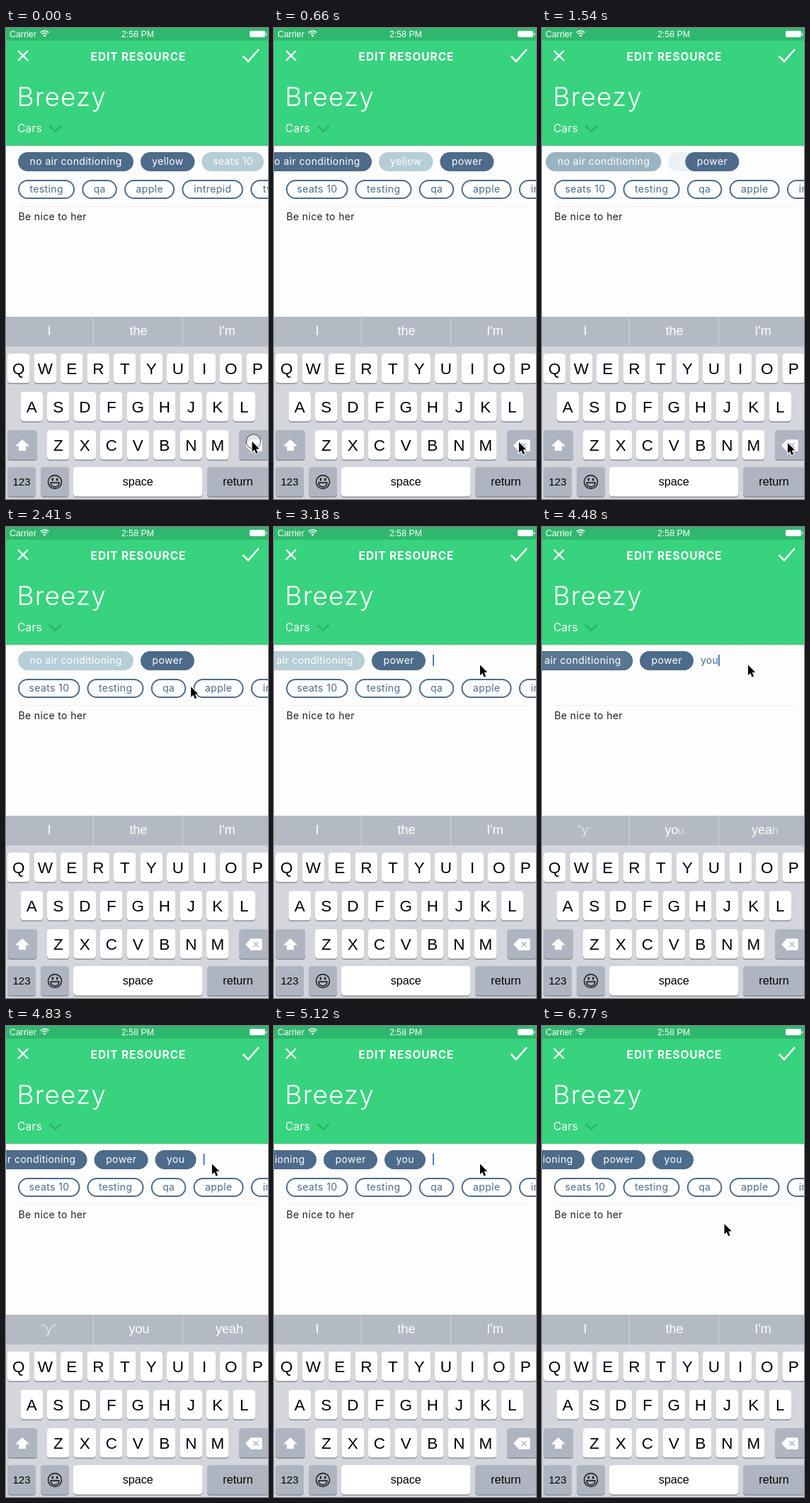
An HTML page with a canvas for the animation above (6830 ms loop, 370 px wide and 664 px high).

```html
<!DOCTYPE html>
<html lang="en">
<head>
<meta charset="utf-8">
<title>Edit resource</title>
<style>
  html, body { margin: 0; width: 100%; height: 100%; overflow: hidden; background: #fdfdfd; }
  canvas { display: block; }
</style>
</head>
<body>
<canvas id="stage" width="370" height="664"></canvas>
<script>
const ctx = document.getElementById('stage').getContext('2d');
const LOOP = 6830;
const SANS = 'Inter, sans-serif';
const SYSTEM = '"Liberation Sans", Arial, sans-serif';
const DARK = [77, 107, 138], LIGHT = [182, 206, 214];
const BLUE = `rgb(${DARK})`;
const KEY_GRAY = '#aeb5c0';
const CHIP_WIDTH = {
  'no air conditioning': 163, yellow: 76.5, 'seats 10': 87.5, power: 76, you: 58,
  testing: 80, qa: 49.5, apple: 71, intrepid: 86.5, tv: 48
};
const COMMIT = 4720;

// Timing helpers
const ramp = (t, from, to) => Math.min(1, Math.max(0, (t - from) / (to - from)));
const ease = (t, from, to) => {
  const p = ramp(t, from, to);
  return p * p * (3 - 2 * p);
};
const within = (t, from, to) => t >= from && t < to;
const mix = (a, b, p) => `rgb(${a.map((v, i) => Math.round(v + (b[i] - v) * p))})`;

// Drawing helpers
function text(str, x, y, size, color, { font = SANS, weight = 400, align = 'left', spacing = 0 } = {}) {
  ctx.font = `${weight} ${size}px ${font}`;
  ctx.letterSpacing = spacing + 'px';
  ctx.textAlign = 'left';
  ctx.fillStyle = color;
  const width = ctx.measureText(str).width;
  ctx.fillText(str, align === 'center' ? x - (width - spacing) / 2 : x, y);
  return width;
}

function box(x, y, w, h, r, color) {
  ctx.beginPath();
  ctx.roundRect(x, y, w, h, r);
  ctx.fillStyle = color;
  ctx.fill();
}

function line(points, color, width, close) {
  ctx.beginPath();
  points.forEach(([x, y]) => ctx.lineTo(x, y));
  if (close) ctx.closePath();
  ctx.strokeStyle = color;
  ctx.lineWidth = width;
  ctx.stroke();
}

function shape(points, color) {
  ctx.beginPath();
  points.forEach(([x, y]) => ctx.lineTo(x, y));
  ctx.closePath();
  ctx.fillStyle = color;
  ctx.fill();
}

function arc(x, y, r, from, to, color, width) {
  ctx.beginPath();
  ctx.arc(x, y, r, from, to);
  ctx.strokeStyle = color;
  ctx.lineWidth = width;
  ctx.stroke();
}

function faded(alpha, draw) {
  if (alpha <= 0) return;
  ctx.save();
  ctx.globalAlpha = alpha;
  draw();
  ctx.restore();
}

function chip(label, x, y, { light = 0, outline = false, alpha = 1 } = {}) {
  const w = CHIP_WIDTH[label];
  faded(alpha, () => {
    if (outline) {
      box(x + 1, y + 1, w - 2, 25, 12.5, '#fff');
      ctx.strokeStyle = BLUE;
      ctx.lineWidth = 2;
      ctx.stroke();
    } else {
      box(x, y, w, 27, 13.5, mix(DARK, LIGHT, light));
    }
    text(label, x + w / 2, y + 17.5, 14, outline ? BLUE : '#fff', { align: 'center', spacing: 0.4 });
  });
}

function drawHeader() {
  box(0, 0, 370, 166, 0, '#37d37e');
  box(0, 0, 370, 18, 0, '#2fb86d');
  const shadow = ctx.createLinearGradient(0, 165, 0, 168);
  shadow.addColorStop(0, 'rgba(120,150,135,.4)');
  shadow.addColorStop(1, 'rgba(120,150,135,0)');
  box(0, 165, 370, 3, 0, shadow);

  text('Carrier', 5, 13, 12.4, '#fff', { font: SYSTEM });
  text('2:58 PM', 186, 13, 12.4, '#fff', { font: SYSTEM, align: 'center' });
  for (const r of [8, 5]) arc(54.5, 12, r, -Math.PI * 0.76, -Math.PI * 0.24, '#fff', 1.7);
  shape([[52.5, 10.5], [54.5, 9.3], [56.5, 10.5], [54.5, 13]], '#fff');
  box(344, 4, 22, 9, 2, '#fff');
  box(367, 7, 1.5, 3.5, 0.7, '#fff');

  line([[17, 32], [31, 46]], '#fff', 2.4);
  line([[31, 32], [17, 46]], '#fff', 2.4);
  line([[334.5, 39.5], [342, 47], [357, 30]], '#fff', 2.6);
  line([[61.5, 138], [69.5, 145.5], [77.5, 138]], '#2bb66a', 3);
  text('EDIT RESOURCE', 186.5, 46, 15.5, '#fff', { weight: 700, align: 'center', spacing: 0.9 });
  text('Breezy', 15.5, 110, 37, '#fff', { weight: 300, spacing: 1.1 });
  text('Cars', 16, 147, 15.5, '#fff', { spacing: 0.2 });
}

function caretAlpha(t) {
  if (t < 2800) return 0;
  if (t < 4190) return 1 - ramp(t, 3670, 3830);
  if (t < 5600) return 1;
  if (t < 6000) return 1 - ramp(t, 5550, 5760);
  return ramp(t, 6000, 6180) - ramp(t, 6550, 6770);
}

function drawTags(t) {
  const dropSeats = ease(t, 330, 650);
  const dropYellow = ease(t, 1345, 1645);
  const focus = ease(t, 2790, 3170);
  const commit = ease(t, COMMIT, 5110);
  const scroll = 42 * dropSeats * (1 - dropYellow) + 52 * focus + 68 * commit;
  const top = 175;

  const selected = dropYellow * (1 - ramp(t, 4190, 4520));
  chip('no air conditioning', 17 - scroll, top, { light: selected });
  if (within(t, 4190, 4520)) {
    ctx.strokeStyle = BLUE;
    ctx.lineWidth = 1.5;
    ctx.beginPath();
    ctx.roundRect(17.75 - scroll, top + 0.75, 161.5, 25.5, 12.75);
    ctx.stroke();
  }
  chip('yellow', 190 - scroll, top, { light: dropSeats, alpha: 1 - dropYellow });
  chip('seats 10', 276.5 - scroll, top, { light: 1, alpha: 1 - dropSeats });
  chip('power', 374 - 97.5 * dropSeats - 86.5 * dropYellow - scroll, top);

  let caretX = 276 - scroll;
  if (t >= COMMIT) {
    chip('you', 276 - scroll, top);
    caretX = 344 - scroll;
  } else if (t >= 4190) {
    const typed = 'you'.slice(0, t < 4310 ? 1 : t < 4430 ? 2 : 3);
    caretX += text(typed, caretX, 192.5, 14, BLUE, { spacing: 0.2 });
  }
  faded(caretAlpha(t), () => box(caretX, 180, 2, 16, 0, '#3f7fc9'));

  if (!within(t, 4190, COMMIT)) {
    let x = 17 + 97.5 * dropSeats;
    for (const label of ['testing', 'qa', 'apple', 'intrepid', 'tv']) {
      chip(label, x, 214, { outline: true });
      x += CHIP_WIDTH[label] + 10.3;
    }
    chip('seats 10', 17, 214, { outline: true, alpha: dropSeats });
  }
  box(18, 251, 342, 1, 0, '#eeeff0');
  text('Be nice to her', 17.5, 270.5, 14, '#222', { spacing: 0.35 });
}

function drawPredictions(t) {
  box(0, 407, 370, 42, 0, '#b3bac4');
  box(123, 407, 1, 42, 0, '#d2d6dc');
  box(249, 407, 1, 42, 0, '#d2d6dc');
  const typing = ramp(t, 4190, 4370) - ramp(t, 4860, 5110);
  const grow = ramp(t, 4250, 4640);
  const centers = [61, 187, 312];
  faded(1 - typing, () => ['I', 'the', "I'm"].forEach((word, i) =>
    text(word, centers[i], 433, 18, '#fff', { font: SYSTEM, align: 'center' })));
  [['“y', '”', 50], ['yo', 'u', 173.5], ['yea', 'h', 296]].forEach(([head, tail, x], i) => {
    const strength = typing * (i ? 1 : 0.6);
    faded(strength, () => { x += text(head, x, 433, 18, '#fff', { font: SYSTEM }); });
    faded(strength * grow, () => text(tail, x, 433, 12 + 6 * grow, '#fff', { font: SYSTEM }));
  });
}

function key(x, y, w, label = '', color = '#fff', size = 22.5) {
  box(x, y + 1, w, 42, 4.5, '#898c92');
  box(x, y, w, 41.5, 4.5, color);
  text(label, x + w / 2, y + (size > 20 ? 29 : 26), size, '#000', { font: SYSTEM, align: 'center' });
}

function drawKeyboard(t) {
  box(0, 449, 370, 215, 0, '#d3d6dc');
  [['QWERTYUIOP', 2], ['ASDFGHJKL', 20.5], ['ZXCVBNM', 58]].forEach(([letters, left], row) =>
    [...letters].forEach((letter, i) => key(left + i * 37.5, 459 + row * 54, 31.5, letter)));

  key(2, 567, 42, '', KEY_GRAY);
  shape([[23, 580], [33, 589.5], [28, 589.5], [28, 596], [18, 596], [18, 589.5], [13, 589.5]], '#fff');

  const pressed = within(t, 300, 420) || within(t, 1310, 1430);
  key(329, 567, 42, '', pressed ? '#fff' : KEY_GRAY);
  const icon = [[339, 588.5], [346, 581], [361, 581], [361, 596], [346, 596]];
  ctx.lineJoin = 'round';
  shape(icon, '#fff');
  line(icon, pressed ? '#222' : '#fff', 1.3, true);
  const cross = pressed ? '#222' : KEY_GRAY;
  line([[349.5, 585], [356.5, 592]], cross, 1.5);
  line([[356.5, 585], [349.5, 592]], cross, 1.5);
  ctx.lineJoin = 'miter';

  key(2, 619, 40, '123', KEY_GRAY, 15);
  key(49, 619, 40, '', KEY_GRAY);
  key(95, 619, 182.5, 'space', '#fff', 16.2);
  key(284, 619, 87, 'return', KEY_GRAY, 16.2);

  arc(69, 640, 9.5, 0, Math.PI * 2, '#111', 1.4);
  box(64.7, 634.5, 2.2, 4, 1, '#111');
  box(71.1, 634.5, 2.2, 4, 1, '#111');
  ctx.beginPath();
  ctx.arc(69, 641, 6, 0, Math.PI);
  ctx.closePath();
  ctx.stroke();
}

// Pointer stops: time, x, y
const PATH = [
  [0, 347.5, 583], [59, 347.5, 583], [60, 346, 584], [959, 346, 584], [960, 347, 585],
  [1640, 347, 585], [1980, 286, 408], [2200, 243, 300], [2420, 262, 222], [2650, 291, 194.5],
  [5550, 291, 194.5], [5760, 257.5, 279]
];

function pointerAt(t) {
  const next = PATH.findIndex(stop => stop[0] > t);
  if (next < 0) return PATH[PATH.length - 1].slice(1);
  const [t0, x0, y0] = PATH[next - 1], [t1, x1, y1] = PATH[next];
  const p = (t - t0) / (t1 - t0);
  return [x0 + (x1 - x0) * p, y0 + (y1 - y0) * p];
}

function drawPointer(t) {
  const [x, y] = pointerAt(t);
  ctx.save();
  ctx.translate(x, y);
  if ([[0, 60], [300, 420], [1310, 1430], [2760, 2880]].some(([from, to]) => within(t, from, to))) {
    arc(2, 0, 10, 0, Math.PI * 2, '#222', 1.1);
    ctx.fillStyle = 'rgba(255,255,255,.65)';
    ctx.fill();
  }
  const arrow = [[0, 0], [0, 14.5], [3.3, 11.5], [5.6, 17], [8.1, 16], [5.8, 10.6], [10.2, 10.3]];
  line(arrow, '#fff', 2, true);
  shape(arrow, '#000');
  ctx.restore();
}

function render(t) {
  box(0, 0, 370, 664, 0, '#fdfdfd');
  drawHeader();
  drawTags(t);
  drawPredictions(t);
  drawKeyboard(t);
  drawPointer(t);
}

const start = performance.now();
function tick() {
  render((performance.now() - start) % LOOP);
  requestAnimationFrame(tick);
}
tick();
</script>
</body>
</html>
```
